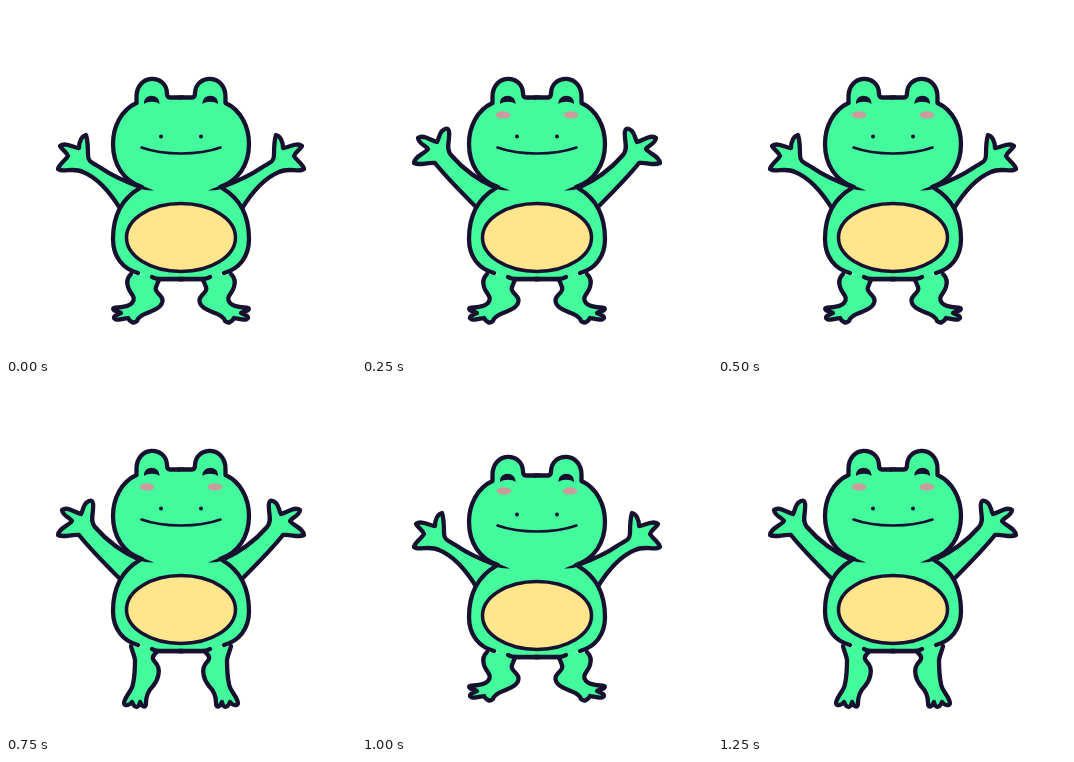
Write an HTML page that moves like this. It is 350 px wide and 350 px high and loops after 1500 ms.

```html
<!DOCTYPE html>
<html lang="en">
<head>
<meta charset="utf-8">
<title>Dancing frog</title>
<style>
  html, body { margin: 0; width: 100%; height: 100%; overflow: hidden; background: #fff; }
  svg { display: block; width: 100%; height: 100%; }
  .skin { fill: #43fb9d; }
  .line { stroke: #17102f; stroke-width: 4.3; stroke-linecap: round; stroke-linejoin: round; }
  .ink { fill: #17102f; }
</style>
</head>
<body>
<svg viewBox="0 0 350 350">
  <defs>
    <path id="armLow" d="M134 181 C118 175 105 169 95 162 C88 157 82 157 82 149 C82 141 82 135 80 129
      C76 130 73 135 73 142 C66 141 59 136 54 140 C56 144 61 146 62 150
      C59 155 53 158 52 163 C57 167 67 161 77 166 C92 172 104 186 115 204"/>
    <path id="armHigh" d="M134 182 C116 174 101 163 89 149 C84 143 87 137 87 131 C88 122 85 121 80 125
      C77 128 77 133 75 136 C68 134 61 128 56 132 C57 138 63 139 66 143
      C62 148 52 151 52 157 C58 160 65 156 73 157 C84 171 100 187 116 203"/>
    <path id="legStand" d="M177 273 H155 C152 273 152 277 150 281 C148 287 156 288 156.500 294
      C157 301 148 304 141 307 C136 309 132 311 131 315 C128 318 124 316 122 312
      C117 313 110 315 108 312 C108 309 112 309 115 307 C112 305 106 305 107.500 302
      C113 301 121 302 126 297 C131 291 124 288 122 281 C120 275 122 271 125 268"/>
    <path id="legJump" d="M177 267 H152 C147 271 145 274 149 278 C156 285 152 296 147 302
      C141 308 140 314 140 319 C140 324 137 324 134 318 C133 324 129 325 126 318
      C123 322 118 322 118 319 C119 312 126 307 127 300 C129 291 129 282 129 276 C128 270 126 267 125 262"/>
    <g id="half">
      <path class="skin line" d="M134 182 C115 193 107 212 107 233 C107 251 117 263 132 267"/>
      <path class="line" d="M177 273 H155 Q149 273 146 271" fill="none"/>
      <path class="skin line" d="M177 91.500 H164 C162 91.500 161 90 161 87 C160 67.500 130.500 67.500 130.500 91 V97
        C115 104 107 121 107 138 C107 159 118 175 136 181"/>
      <path class="ink" d="M132 178 L148 184.500 Q140 185 132 182 Z"/>
      <path class="ink" d="M138 98 C137 87 154 87 153.500 98 C150 95 142 95 138 98 Z"/>
      <circle class="ink" cx="155" cy="130.500" r="2"/>
    </g>
  </defs>
  <g id="frog"></g>
</svg>
<script>
const STEP = 250;
const LIFT = 6;
const frog = document.getElementById("frog");

const low = { arm: "armLow", blush: [141, 109] };
const high = { arm: "armHigh", blush: [141, 109] };
const jump = { ...high, jumping: true };
const poses = [
  { ...low, blush: null }, high, low, jump,
  { ...low, blush: [142, 107] }, jump
];

const both = part => `${part}<g transform="matrix(-1 0 0 1 350 0)">${part}</g>`;
const limb = id => both(`<use href="#${id}" class="skin line"/>`);

function drawPose({ arm, blush, jumping }) {
  const cheeks = blush
    ? both(`<ellipse cx="${blush[0]}" cy="${blush[1]}" rx="7.5" ry="3.7" fill="#cb9c9d"/>`)
    : "";
  const lift = `<g transform="translate(0 ${jumping ? -LIFT : 0})">`;
  return `
    ${lift}${limb(arm)}</g>
    ${limb(jumping ? "legJump" : "legStand")}
    ${lift}
      <path class="skin" d="M160 95 H190 L219 182 V267 L205 272 H145 L131 267 V182 Z"/>
      ${both('<use href="#half"/>')}
      <ellipse class="line" cx="175" cy="231.500" rx="54.500" ry="34" fill="#ffe58c" style="stroke-width:3.500"/>
      <path class="line" d="M135.500 141.500 C158 149.500 192 149.500 214.500 141.500" fill="none" style="stroke-width:2.600"/>
      ${cheeks}
    </g>`;
}

const start = performance.now();
let shown = -1;

function render(now) {
  const index = Math.floor(Math.max(0, now - start) / STEP) % poses.length;
  if (index !== shown) {
    frog.innerHTML = drawPose(poses[index]);
    shown = index;
  }
  requestAnimationFrame(render);
}
render(start);
</script>
</body>
</html>
```
